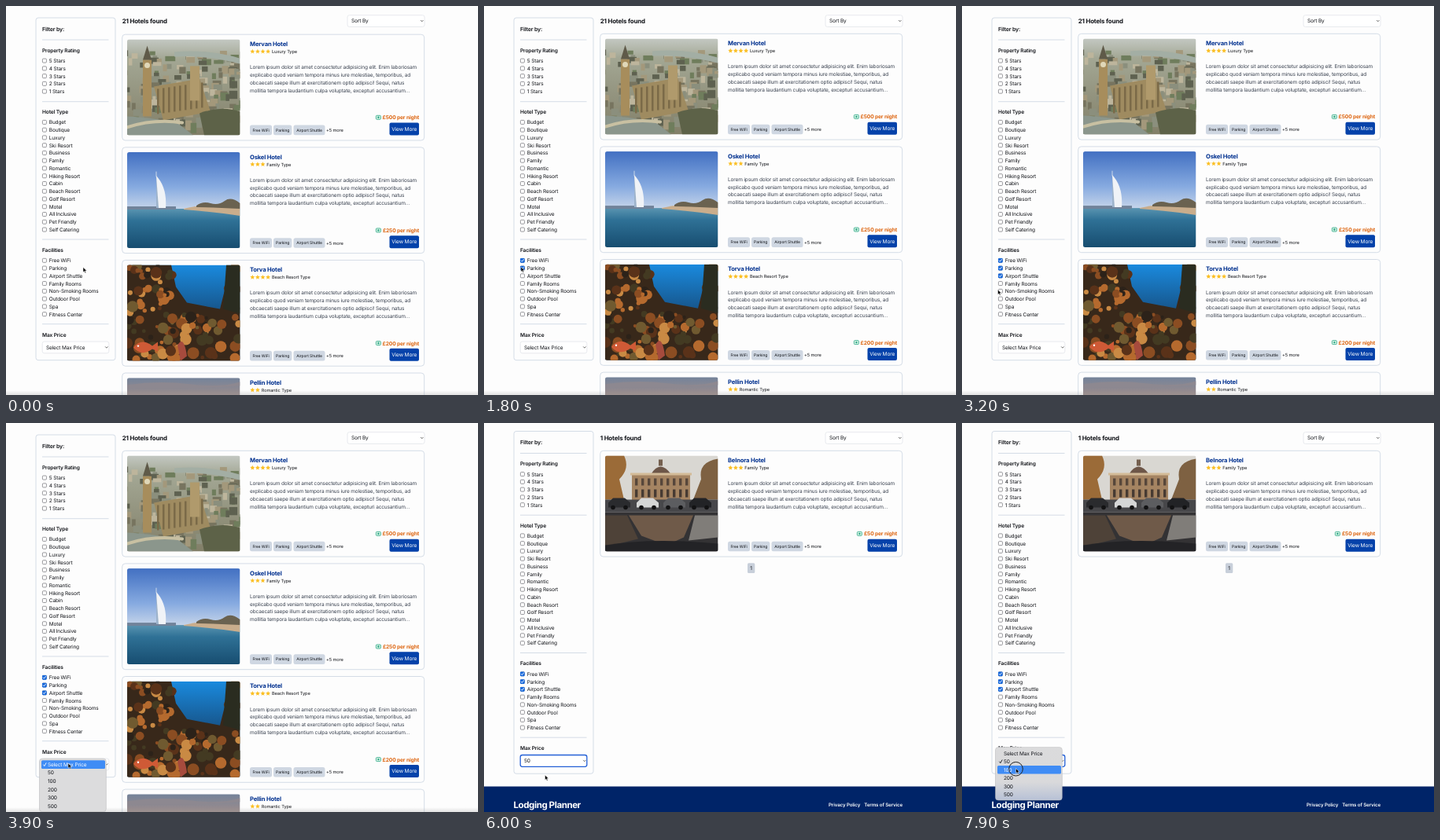
An HTML page that plays this animation: 600x495 px, repeating every 8000 ms.

```html
<!DOCTYPE html>
<html lang="en">
<head>
<meta charset="utf-8">
<title>Hotel search filters</title>
<style>
  html, body { margin: 0; width: 100%; height: 100%; overflow: hidden; background: #fdfdfd; }
  svg { display: block; width: 600px; height: 495px; }
  text {
    font-family: Inter, "Liberation Sans", sans-serif;
    letter-spacing: -.021em;
    text-rendering: geometricPrecision;
    white-space: pre;
  }
  .b { font-weight: 600; }
  .h { font-weight: 700; }
  .line { stroke: #cbd5e1; stroke-width: .8; fill: none; }
</style>
</head>
<body>
<svg id="stage" viewBox="0 0 600 495">
  <defs>
    <clipPath id="frame"><rect width="143.5" height="122" rx="2.5"/></clipPath>
    <linearGradient id="edge" x2="0" y2="1">
      <stop stop-color="#999" stop-opacity="0"/><stop offset="1" stop-color="#999" stop-opacity=".28"/>
    </linearGradient>
  </defs>
  <g id="many"></g>
  <g id="single"></g>
  <g id="side"></g>
  <g id="popup"></g>
  <circle id="ring" r="8.8" fill="none" stroke="#222" stroke-width="1"/>
  <path id="cursor" d="M0 0V6.2L1.5 4.9 2.5 7.2 3.6 6.7 2.6 4.5H4.6Z" fill="#000" stroke="#fff" stroke-width=".5"/>
</svg>
<script>
const $ = id => document.getElementById(id);
const DARK = '#111318', LOOP = 8000;

// ---- drawing helpers ----
const text = (x, mid, size, str, fill = DARK, more = '') =>
  `<text x="${x}" y="${mid + size * .36}" font-size="${size}" fill="${fill}" ${more}>${str}</text>`;
const rect = (x, y, w, h, fill, more = '') =>
  `<rect x="${x}" y="${y}" width="${w}" height="${h}" fill="${fill}" ${more}/>`;
const path = (d, fill, more = '') => `<path d="${d}" fill="${fill}" ${more}/>`;
const circle = (x, y, r, fill) => `<circle cx="${x}" cy="${y}" r="${r}" fill="${fill}"/>`;
const list = (n, make) => Array.from({ length: n }, (_, i) => make(i)).join('');
const fade = (id, ...stops) =>
  `<linearGradient id="${id}" x2="0" y2="1">${stops.map(([o, c]) =>
    `<stop offset="${o}" stop-color="${c}"/>`).join('')}</linearGradient>`;
const stroke = (d, color, width) =>
  path(d, 'none', `stroke="${color}" stroke-width="${width}" stroke-linecap="round" stroke-linejoin="round"`);
const chevron = (x, y) => stroke(`M${x - 1.4} ${y - .7}l1.4 1.5 1.4-1.5`, '#333', .7);

function random(seed) {
  return () => (seed = (seed * 16807) % 2147483647) / 2147483647;
}

// ---- photo stand-ins, 143.5 x 122 ----
const W = 143.5, H = 122;

function cityPhoto() {
  const r = random(71), tones = ['#77745f', '#a3987b', '#bdb59c', '#5e6150', '#8b8f7d', '#6f7d5c'];
  const blocks = list(150, i => {
    const y = 14 + i * .62;
    return rect(r() * 150 - 6, y, 4 + r() * 9, 3 + r() * 6 + y * .04, tones[r() * 6 | 0]);
  });
  return fade('haze', [0, '#c3c8c2'], [.2, '#a3a794'], [1, '#827f68']) + rect(0, 0, W, H, 'url(#haze)') + blocks +
    path('M60 16Q100 12 143 24V31Q100 20 60 22Z', '#a3aea4') +
    path('M34 60L92 50 106 92 46 103Z', '#9f8b60') +
    list(9, i => rect(38 + i * 7, 63 - i, 2.5, 32, '#7b6a48')) +
    rect(20, 26, 11, 72, '#a78d5c') + path('M20 26L25.5 8 31 26Z', '#5f5a49') + circle(25.5, 33, 3.5, '#e0d7b8') +
    rect(80, 34, 12, 44, '#b09a6c') +
    path('M0 98Q40 100 66 108L84 122H0Z', '#8b968c') +
    stroke('M0 112Q34 101 70 106', '#c8c0a2', 4) +
    path('M92 94Q120 84 143.5 92V122H98Z', '#5d6248');
}

function seaPhoto() {
  return fade('sky', [0, '#4270c2'], [.6, '#86aae0'], [1, '#c9d7ea']) + fade('sea', [0, '#5a94b0'], [.3, '#2f7196'], [1, '#174d70']) +
    rect(0, 0, W, 74, 'url(#sky)') + rect(0, 72, W, 50, 'url(#sea)') +
    rect(0, 69, 62, 4, '#71839a') +
    path('M72 72Q96 66 143.5 65V81Q112 76 72 73Z', '#c9ad8c') +
    path('M88 68Q96 62 106 65T124 62 143.5 65V72Q110 70 88 70Z', '#6a6250') +
    path('M37 71V30Q51 45 49 71Z', '#f0f3f7') + path('M37 71V30L40 71Z', '#9db3cb') +
    stroke('M37 31V25', '#e3e8ee', .8);
}

function reefPhoto() {
  const r = random(29), tones = ['#8b4d22', '#b56a2e', '#5a3219', '#2c2219', '#705a30', '#c98a44', '#433a22'];
  const coral = list(150, i => {
    const x = r() * W, y = r() * H;
    return y < 56 && x > 58 && x < 128 ? '' : circle(x, y, 2 + r() * 5.5, tones[(r() * 7) | 0]);
  });
  return fade('deep', [0, '#1a8ade'], [.45, '#17588f'], [1, '#15212a']) + rect(0, 0, W, H, 'url(#deep)') +
    path('M0 0H56L62 28 76 48 118 56 132 0H143.5V122H0Z', '#38281a') + coral +
    path('M126 0H143.5V62L122 56Z', '#2a2c20') +
    path('M8 105Q18 92 32 103L39 98V110L32 107Q18 117 8 105Z', '#cf5a36') + circle(14, 103, 1.2, '#fff') +
    path('M64 102Q72 88 76 116L68 122Z', '#a64b3d');
}

function duskPhoto() {
  return fade('dusk', [0, '#74839a'], [.2, '#a08d8a'], [1, '#6b5c5c']) + rect(0, 0, W, H, 'url(#dusk)') +
    path('M0 9Q40 3 80 8T143.5 5V10Q90 15 0 13Z', '#8d8890');
}

function streetPhoto() {
  const house = rect(34, 24, 74, 34, '#a58462') + path('M58 24Q70 4 84 24Z', '#6d5648') + rect(68, 5, 5, 8, '#75604f') +
    rect(32, 22, 78, 3, '#d3bb98') + list(9, i => rect(38 + i * 8, 29, 3.4, 9, '#57473b') + rect(38 + i * 8, 43, 3.4, 10, '#473b33'));
  const cars = rect(0, 56, W, 16, '#47474a') +
    [[4, '#2a2b2e'], [40, '#d5d6d6'], [74, '#5c5d60'], [107, '#222326']].map(([x, c]) =>
      path(`M${x} 66V60L${x + 6} 54H${x + 21}L${x + 28} 60V66Z`, c) +
      circle(x + 6, 66, 2.8, '#121213') + circle(x + 22, 66, 2.8, '#121213')).join('');
  return rect(0, 0, W, H, '#d9d7d2') +
    path('M0 0H24Q32 16 18 30L24 56H0Z', '#9b6b38') + path('M143.5 4Q118 8 122 30L112 56H143.5Z', '#7e6142') +
    house + cars + rect(0, 72, W, 50, '#333234') +
    path('M30 76H112L100 104 78 114 46 102Z', '#6f5a49') + path('M0 76H28L42 106 0 116Z', '#4e4238') +
    path('M114 76H143.5V104L106 108Z', '#807d79') + path('M0 114Q60 104 143.5 112V122H0Z', '#232326');
}

// ---- page parts ----
const BLURB = [
  'Lorem ipsum dolor sit amet consectetur adipisicing elit. Enim laboriosam',
  'explicabo quod veniam tempora minus iure molestiae, temporibus, ad',
  'obcaecati saepe illum at exercitationem optio adipisci! Sequi, natus',
  'mollitia tempora laudantium culpa voluptate, excepturi accusantium…'
];

const star = (x, y) => path('M' + Array.from({ length: 10 }, (_, k) => {
  const a = k * Math.PI / 5, r = k % 2 ? 1.45 : 3.2;
  return `${(x + r * Math.sin(a)).toFixed(2)} ${(y - r * Math.cos(a)).toFixed(2)}`;
}).join('L') + 'Z', '#fbbf24');

const chip = (x, w, label) => rect(x, 115.7, w, 12.6, '#cfd7e2', 'rx="2.5"') +
  text(x + w / 2, 122, 5, label, DARK, 'text-anchor="middle"');

function card(y, name, stars, type, price, photo) {
  const icon = 524 - (price > 99 ? 54 : 50);
  return `<g transform="translate(0 ${y})">` +
    rect(147.7, .3, 384, 134.8, '#fdfdfd', 'class="line" rx="4"') +
    `<g transform="translate(154 6.5)" clip-path="url(#frame)">${photo}</g>` +
    text(310, 12.3, 7.6, name, '#00308f', 'class="h"') +
    list(stars, i => star(313.3 + i * 6.6, 22)) +
    text(311.5 + stars * 6.6, 22, 5.7, type + ' Type') +
    BLURB.map((s, i) => text(310, 42 + i * 9.77, 6.5, s, '#3a4250')).join('') +
    chip(310, 28, 'Free WiFi') + chip(340, 23.3, 'Parking') + chip(365.5, 40, 'Airport Shuttle') +
    text(407, 122, 5.7, '+5 more') +
    rect(icon + .4, 103.4, 6, 5, '#d8f3e6', 'rx="1" stroke="#2aa784" stroke-width=".8"') + circle(icon + 3.4, 105.9, 1.2, '#2aa784') +
    text(525, 106, 6.7, `£${price} per night`, '#dd6510', 'class="h" text-anchor="end"') +
    rect(487.5, 112.7, 37.5, 16, '#0542aa', 'rx="2"') +
    text(506.2, 120.6, 6.6, 'View More', '#fff', 'text-anchor="middle"') + '</g>';
}

const header = count => text(147.7, 19.3, 7.9, count + ' Hotels found', DARK, 'class="h"') +
  rect(434, 11.7, 98, 14.8, '#fff', 'rx="2.5" stroke="#e2e5ea" stroke-width=".8"') +
  text(439, 19.1, 6.5, 'Sort By') + chevron(528.8, 19);

$('many').innerHTML = header(21) + '<g id="cards">' + [
  ['Mervan Hotel', 4, 'Luxury', 500, cityPhoto()],
  ['Oskel Hotel', 3, 'Family', 250, seaPhoto()],
  ['Torva Hotel', 4, 'Beach Resort', 200, reefPhoto()],
  ['Pellin Hotel', 2, 'Romantic', 150, duskPhoto()]
].map((c, i) => card(35 + i * 143.6, ...c)).join('') + '</g>' + rect(0, 489, 600, 6, 'url(#edge)');

$('single').innerHTML = header(1) + card(35, 'Belnora Hotel', 3, 'Family', 50, streetPhoto()) +
  rect(335, 178.3, 9.3, 12.8, '#c8cfda', 'rx="1.5"') + text(339.6, 184.8, 6.5, '1', DARK, 'text-anchor="middle"') +
  rect(0, 462.5, 600, 33, '#002468') +
  text(37.5, 486, 11.5, 'Lodging Planner', '#fff', 'class="h" style="letter-spacing:-.035em"') +
  text(438, 486, 6.2, 'Privacy Policy', '#fff', 'class="b"') +
  text(532, 486, 6.2, 'Terms of Service', '#fff', 'class="b" text-anchor="end"');

const tick = (x, y) => stroke(`M${x - 1.5} ${y}l1.1 1.3 2-2.8`, '#fff', .9);
const options = (top, labels, id = '') => labels.map((s, i) => {
  const y = top + i * 9.76;
  return rect(46.4, y - 2.6, 5, 5, '#fff', 'rx="1" stroke="#6f6f74" stroke-width=".7"') +
    (id ? `<g id="${id + i}">${rect(46, y - 2.9, 5.7, 5.7, '#1668dc', 'rx="1.1"') + tick(48.8, y)}</g>` : '') +
    text(54.8, y, 6.5, s);
}).join('');
const section = (y, label) => text(46, y, 6.6, label, DARK, 'class="b"');

$('side').innerHTML = rect(38, 15, 101, 435.7, '#fdfdfd', 'class="line" rx="3"') +
  text(46, 29.4, 7, 'Filter by:', DARK, 'class="b"') +
  [43, 121.7, 297, 404.7].map(y => path(`M46 ${y}H130.5`, 'none', 'class="line"')).join('') +
  section(56.5, 'Property Rating') +
  options(69.7, [5, 4, 3, 2, 1].map(n => n + ' Stars')) +
  section(134.7, 'Hotel Type') +
  options(148, ['Budget', 'Boutique', 'Luxury', 'Ski Resort', 'Business', 'Family', 'Romantic', 'Hiking Resort',
    'Cabin', 'Beach Resort', 'Golf Resort', 'Motel', 'All Inclusive', 'Pet Friendly', 'Self Catering']) +
  section(310.6, 'Facilities') +
  options(323.9, ['Free WiFi', 'Parking', 'Airport Shuttle', 'Family Rooms', 'Non-Smoking Rooms',
    'Outdoor Pool', 'Spa', 'Fitness Center'], 'check') +
  section(418.5, 'Max Price') +
  rect(46.2, 427, 84.6, 14.8, '#fff', 'id="box" rx="2.5"') +
  text(51, 434.5, 6.5, 'Select Max Price', DARK, 'id="choice"') + chevron(127.8, 434.4);

const PRICES = ['Select Max Price', 50, 100, 200, 300, 500];

function popup(top, chosen, hot) {
  const glass = chosen ? fade('glass', [0, '#dbdbdc'], [.66, '#d9d9db'], [1, '#b7c1d6']) : '';
  return glass + rect(42.3, top + .8, 85, 67.4, '#000', 'rx="4" opacity=".14"') +
    rect(42.5, top, 84.8, 67.4, chosen ? 'url(#glass)' : '#dcdcdd', 'rx="3.5" stroke="#bdbdbf" stroke-width=".5"') +
    PRICES.map((s, i) => {
      const y = top + 7.6 + i * 10.55, ink = i === hot ? '#fff' : DARK;
      return (i === hot ? rect(45, y - 5.3, 81, 10.6, '#3f8cf5', 'rx="1.5"') : '') +
        (i === chosen ? stroke(`M47.6 ${y + .3}l1.2 1.6 2.2-3.8`, ink, .9) : '') + text(53, y, 6.5, s, ink);
    }).join('');
}

// ---- timeline ----
const MOVES = [
  [100, 98, 332.5], [800, 48, 323.5], [1100, 48, 323.5], [1500, 47, 332], [1800, 47, 332],
  [2300, 47, 341], [2700, 47, 341], [3100, 45.5, 361], [3200, 45.5, 361], [3500, 79, 433],
  [3900, 79, 433], [4500, 77, 447.5], [5500, 77.5, 448], [6200, 77.5, 448],
  [6900, 76, 429], [7200, 76, 429], [7700, 68.5, 439.5]
];
const CLICKS = [1500, 2400, 3500, 5200, 7000, 7800];
const CHECKS = [900, 1700, 2600];
const LOADED = 900, PICKED = 5500, FILTERED = 5600;

function cursorAt(t) {
  const i = MOVES.findIndex(m => m[0] > t);
  if (i < 1) return (i ? MOVES[MOVES.length - 1] : MOVES[0]).slice(1);
  const [t0, x0, y0] = MOVES[i - 1], [t1, x1, y1] = MOVES[i];
  const k = (t - t0) / (t1 - t0), e = k * k * (3 - 2 * k);
  return [x0 + (x1 - x0) * e, y0 + (y1 - y0) * e];
}

const show = (id, on) => $(id).setAttribute('display', on ? 'inline' : 'none');
const move = (id, x, y) => $(id).setAttribute('transform', `translate(${x} ${y})`);

function draw(t) {
  const [x, y] = cursorAt(t), filtered = t >= FILTERED, picked = t >= PICKED;
  show('many', !filtered);
  show('single', filtered);
  move('cards', 0, t < LOADED ? .9 : 0);
  move('side', 0, filtered ? -4.5 : 0);
  for (let i = 0; i < 8; i++) show('check' + i, t >= CHECKS[i]);
  $('choice').textContent = picked ? '50' : PRICES[0];
  $('box').setAttribute('stroke', picked ? '#2460d6' : '#e2e5ea');
  $('box').setAttribute('stroke-width', picked ? 1.3 : .8);

  const open = (t >= 3600 && t < PICKED) || t >= 7100, top = filtered ? 412.6 : 427;
  $('popup').innerHTML = open ? popup(top, picked ? 1 : 0, Math.floor((y - top - 2.3) / 10.55)) : '';

  move('cursor', x, y);
  move('ring', x, y + .7);
  show('ring', CLICKS.some(c => t >= c && t < c + 200));
}

let last = -1;
function tickFrame(now) {
  const t = Math.floor(now % LOOP / 100) * 100;
  if (t !== last) draw(last = t);
  requestAnimationFrame(tickFrame);
}
draw(0);
requestAnimationFrame(tickFrame);
</script>
</body>
</html>
```
